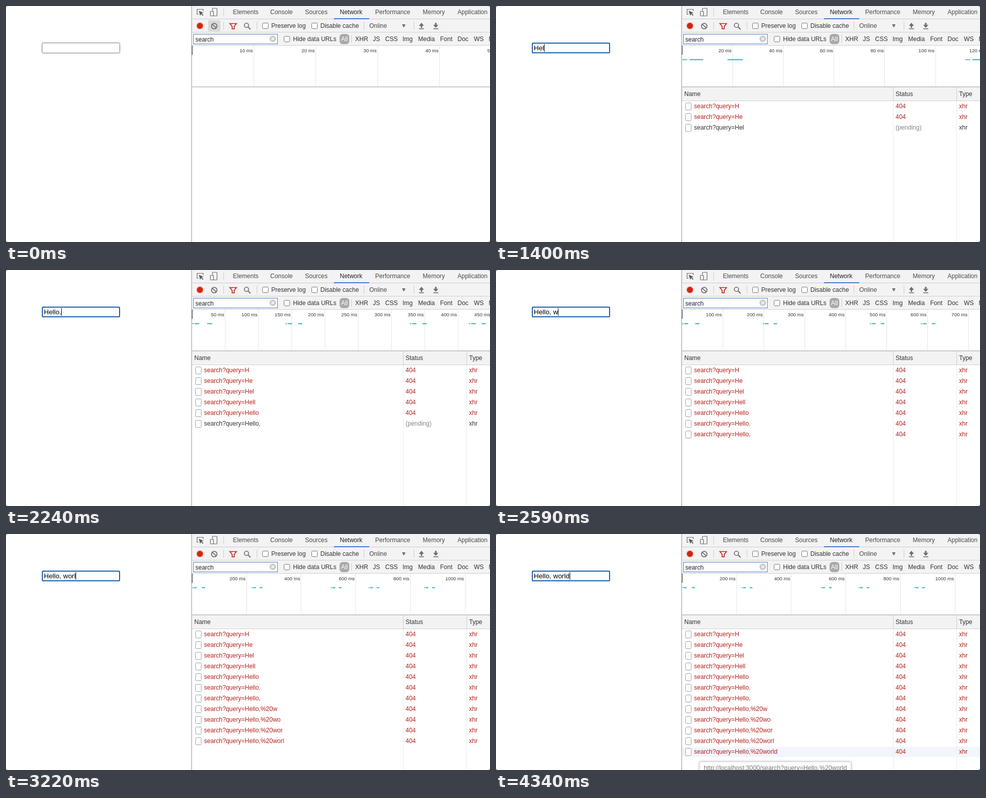
These frames come from a looping animation (946 by 464 pixels, 4.41 s). An HTML page with a canvas:

```html
<!DOCTYPE html>
<html lang="en">
<head>
<meta charset="utf-8">
<title>Search requests while typing</title>
<style>
  html, body { margin: 0; width: 100%; height: 100%; overflow: hidden; background: #fff; }
  canvas { display: block; width: 946px; height: 464px; }
</style>
</head>
<body>
<canvas id="stage" width="946" height="464"></canvas>
<script>
const W = 946, H = 464, LOOP = 4410, TICK = 70, LEFT = 363;
const FONT = '"Liberation Sans", Arial, Helvetica, sans-serif';
const RED = '#b3211c', INK = '#333', GREY = '#6e6e6e';
const ctx = document.getElementById('stage').getContext('2d');

// Typed text with the times of the key press, the request and its answer.
const requests = [
  ['H', 770, 910, 980],
  ['He', 1120, 1190, 1260],
  ['Hel', 1330, 1400, 1470],
  ['Hell', 1540, 1610, 1680],
  ['Hello', 1750, 1820, 1890],
  ['Hello,', 2100, 2240, 2310],
  ['Hello, ', 2380, 2450, 2520],
  ['Hello, w', 2590, 2660, 2730],
  ['Hello, wo', 2730, 2800, 2870],
  ['Hello, wor', 2940, 3010, 3080],
  ['Hello, worl', 3080, 3150, 3220],
  ['Hello, world', 3290, 3290, 3360]
].map(([text, typed, sent, done]) => ({ text, typed, sent, done }));

// Overview scale: start time, ms per division, division width, bar unit.
const scales = [
  [0, 10, 121, 0],
  [980, 10, 99, 2200],
  [1260, 20, 99.1, 553],
  [1470, 50, 145, 330],
  [1680, 50, 100, 233],
  [1890, 50, 65, 182],
  [2310, 100, 97, 169],
  [2520, 100, 80, 157],
  [2730, 100, 66.7, 145],
  [3010, 200, 117, 127],
  [3150, 200, 106.7, 116]
];
const barStarts = [0, 1, 2.335, 2.97, 3.905];

const clamp = v => Math.max(0, Math.min(1, v));

function box(x, y, w, h, color) {
  ctx.fillStyle = color;
  ctx.fillRect(x, y, w, h);
}

function rounded(x, y, w, h, r, fill, stroke, width = 1) {
  ctx.beginPath();
  ctx.roundRect(x, y, w, h, r);
  if (fill) { ctx.fillStyle = fill; ctx.fill(); }
  if (stroke) { ctx.strokeStyle = stroke; ctx.lineWidth = width; ctx.stroke(); }
}

function label(text, x, y, color = INK, size = 12, align = 'left') {
  ctx.font = `${size}px ${FONT}`;
  ctx.textAlign = align;
  ctx.fillStyle = color;
  ctx.fillText(text, x, y);
}

function circle(x, y, r, fill, stroke, width = 1) {
  ctx.beginPath();
  ctx.arc(x, y, r, 0, Math.PI * 2);
  if (fill) { ctx.fillStyle = fill; ctx.fill(); }
  if (stroke) { ctx.strokeStyle = stroke; ctx.lineWidth = width; ctx.stroke(); }
}

function path(points, { fill, stroke, width = 1, close = false }) {
  ctx.beginPath();
  points.forEach(([x, y], i) => i ? ctx.lineTo(x, y) : ctx.moveTo(x, y));
  if (close) ctx.closePath();
  if (fill) { ctx.fillStyle = fill; ctx.fill(); }
  if (stroke) { ctx.strokeStyle = stroke; ctx.lineWidth = width; ctx.stroke(); }
}

function faded(alpha, draw) {
  if (alpha <= 0) return;
  ctx.save();
  ctx.globalAlpha = alpha;
  draw();
  ctx.restore();
}

function drawField(t) {
  const focus = t < 210 ? 0 : t < 280 ? 0.5 : 1;
  rounded(70.5, 72.5, 152, 20, 2, '#fff', '#767676');
  faded(focus, () => rounded(71, 73, 151, 19, 2.5, '#fff', '#1f5fa8', 2));
  const last = requests.filter(r => t >= r.typed).pop();
  const text = last ? last.text : '';
  label(text, 74, 87, '#000', 13.333);
  if (t < 280) return;
  const caret = 74 + ctx.measureText(text).width;
  const off = clamp((t - 3640) / 210), on = clamp((t - 4130) / 210);
  faded(1 - off + on, () => box(Math.round(caret), 75, 1, 15, '#000'));
}

function drawTabs() {
  box(LEFT, 0, W - LEFT, 26, '#f3f3f3');
  box(LEFT, 25, W - LEFT, 1, '#ccc');
  // element picker
  path([[376, 16.5], [373.5, 16.5], [373.5, 6.5], [385.5, 6.5], [385.5, 10]], { stroke: GREY, width: 1.2 });
  path([[377, 9.5], [386, 13.2], [382.6, 14.4], [386, 18], [384.6, 19.2], [381.3, 15.7], [379.5, 19]],
    { fill: '#5a5a5a', close: true });
  // device toggle
  rounded(403.5, 4.5, 9, 15, 1, null, GREY, 1.2);
  rounded(399.5, 10.5, 6, 9, 1, '#f3f3f3', GREY, 1.2);
  box(425, 5, 1, 15, '#ccc');
  [['Elements', 443.5], ['Console', 516.5], ['Sources', 584.5], ['Network', 652.5],
   ['Performance', 721.5], ['Memory', 814.5], ['Application', 882.5]]
    .forEach(([name, x]) => label(name, x, 16, name === 'Network' ? '#222' : '#4a4a4a'));
  box(641, 24, 69, 2, '#4080cf');
}

function drawArrow(x, up) {
  const tip = up ? 33 : 43, base = up ? 39 : 37;
  path([[x - 5, base], [x, tip], [x + 5, base]], { fill: GREY, close: true });
  box(x - 1.5, up ? 38 : 33, 3, up ? 5 : 5, GREY);
  box(x - 5, 44, 10, 1.5, GREY);
}

function checkbox(x, y) {
  rounded(x + 0.5, y + 0.5, 11, 11, 2, '#fff', '#767676');
}

function drawToolbar(t) {
  box(LEFT, 26, W - LEFT, 26, '#f3f3f3');
  box(LEFT, 51, W - LEFT, 1, '#d0d0d0');
  circle(379, 39, 7.5, '#f3d0cc');
  circle(379, 39, 6, '#d3260f');
  faded(t < 210 ? 1 : t < 280 ? 0.5 : 0, () => rounded(395, 28, 24, 22, 2, '#d9d9d9'));
  circle(407, 39.5, 5.4, null, GREY, 1.8);
  path([[403.3, 35.8], [410.7, 43.2]], { stroke: GREY, width: 1.8 });
  path([[437.5, 34.5], [450.5, 34.5], [446, 40], [446, 45], [442, 45], [442, 40]],
    { stroke: '#c5221f', width: 1.7, close: true });
  circle(470, 38, 4.2, null, GREY, 1.6);
  path([[473, 41], [478, 46]], { stroke: GREY, width: 2 });
  [425, 490, 699, 797].forEach(x => box(x, 31, 1, 16, '#ccc'));
  checkbox(501, 33);
  label('Preserve log', 518.5, 43);
  checkbox(597, 33);
  label('Disable cache', 614.5, 43);
  label('Online', 710, 43, '#4a4a4a');
  path([[774, 36], [781, 36], [777.5, 42.5]], { fill: GREY, close: true });
  drawArrow(812, true);
  drawArrow(840, false);
}

function drawFilters() {
  box(LEFT, 52, W - LEFT, 26, '#f3f3f3');
  box(LEFT, 77, W - LEFT, 1, '#d0d0d0');
  box(366, 55, 165, 20, '#4a86c8');
  box(367, 56, 163, 18, '#fff');
  label('search', 370, 70, '#222');
  circle(521.5, 64.5, 6.5, '#c9ccd0');
  path([[519, 62], [524, 67]], { stroke: '#fff', width: 1.4 });
  path([[524, 62], [519, 67]], { stroke: '#fff', width: 1.4 });
  checkbox(543, 59);
  label('Hide data URLs', 561, 69);
  rounded(652, 55, 19, 20, 6, '#a9a9a9');
  label('All', 661.5, 69, '#fff', 12, 'center');
  box(675, 57, 1, 16, '#ccc');
  [['XHR', 682.5], ['JS', 717], ['CSS', 741], ['Img', 775], ['Media', 805.5],
   ['Font', 848.5], ['Doc', 882.5], ['WS', 914.5], ['Manifest', 943.5]]
    .forEach(([name, x]) => label(name, x, 69));
}

function drawOverview(t) {
  const [, step, width, unit] = scales.filter(s => t >= s[0]).pop();
  for (let i = 1; i * width < W - LEFT + 40; i++) {
    const x = LEFT + 0.5 + i * width;
    box(Math.round(x - 0.5), 78, 1, 80, '#e6e6e6');
    label(`${i * step} ms`, x - 2, 91, INK, 9.5, 'right');
  }
  box(LEFT, 78, 2, 18, '#858585');
  if (unit) barStarts.forEach((start, i) => {
    const x = LEFT + 1 + start * unit;
    const tail = i ? [0.137, 0.182] : [0.16, 0.214];
    [[0, 0.018], [0.026, 0.074], tail].forEach(([a, b], k) =>
      box(x + a * unit, 104.5, (b - a) * unit, 2, k ? '#35b0b4' : '#6cbcb4'));
  });
  box(LEFT, 158, W - LEFT, 2, '#cbcbcb');
}

function drawRow(r, i, t) {
  const y = 187 + i * 21, pending = t < r.done;
  if (i === 11 && t >= 4200) box(LEFT, y + 0.5, W - LEFT, 20, '#f2f5fc');
  rounded(370.5, y + 3.5, 11, 14, 1, '#fff', '#a0a0a0');
  const color = pending ? INK : RED;
  label('search?query=' + r.text.trim().replace(' ', '%20'), 387, y + 14, color);
  label(pending ? '(pending)' : '404', 781, y + 14, pending ? '#858585' : RED);
  label('xhr', 905, y + 14, color);
}

function drawTable(t) {
  const rows = requests.filter(r => t >= r.sent);
  if (!rows.length) return;
  box(LEFT, 160, W - LEFT, 26, '#f3f3f3');
  box(LEFT, 186, W - LEFT, 1, '#cfcfcf');
  label('Name', 368, 177);
  label('Status', 781, 177);
  label('Type', 905, 177);
  rows.forEach((r, i) => drawRow(r, i, t));
  [776, 900].forEach(x => {
    box(x, 160, 1, 26, '#cfcfcf');
    box(x, 187, 1, H - 187, '#ececec');
  });
}

function drawTooltip(t) {
  faded(clamp((t - 4130) / 210), () => {
    ctx.save();
    ctx.shadowColor = 'rgba(0,0,0,.2)';
    ctx.shadowBlur = 4;
    rounded(397.5, 447.5, 297, 24, 3, '#fff', '#d0d0d0');
    ctx.restore();
    label('http://localhost:3000/search?query=Hello,%20world', 406, 464, '#777', 12.27);
  });
}

function drawCorners() {
  [[0, 0, 1, 1], [W, 0, -1, 1], [0, H, 1, -1], [W, H, -1, -1]].forEach(([x, y, dx, dy]) =>
    path([[x, y], [x + 2.5 * dx, y], [x, y + 2.5 * dy]], { fill: '#777', close: true }));
}

function render(t) {
  box(0, 0, W, H, '#fff');
  drawField(t);
  drawTabs();
  drawToolbar(t);
  drawFilters();
  drawOverview(t);
  drawTable(t);
  box(362, 0, 1, H, '#b4b4b4');
  box(363, 0, 1, H, '#d8d8d8');
  box(LEFT, 78, 2, 18, '#858585');
  drawTooltip(t);
  drawCorners();
}

const begin = performance.now();
function frame() {
  const t = (performance.now() - begin) % LOOP;
  render(Math.floor(t / TICK) * TICK);
  requestAnimationFrame(frame);
}
frame();
</script>
</body>
</html>
```
